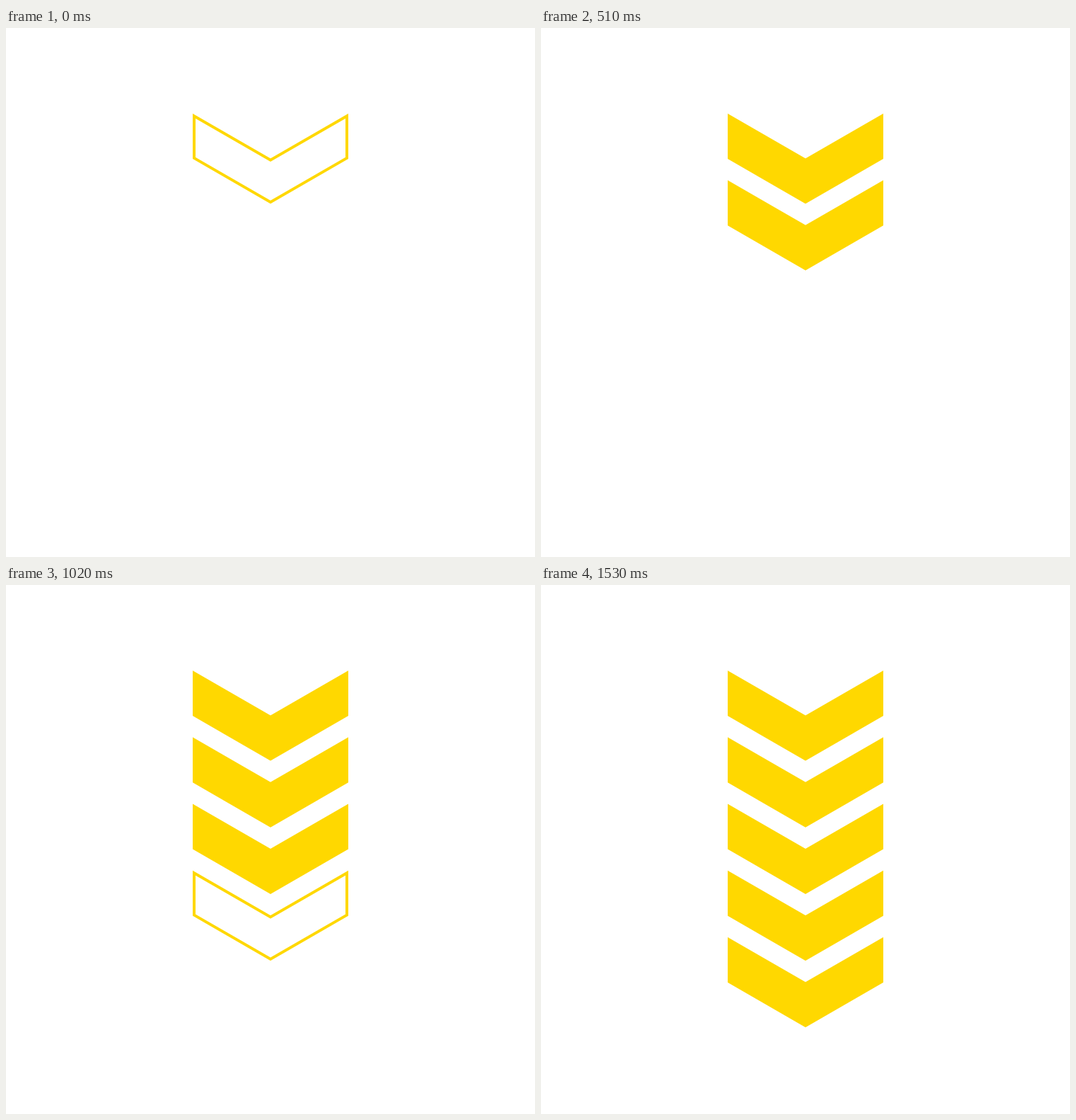
Recreate the animation shown at these times as an HTML page. Size 748 by 748 pixels, loop 1.73 s.

```html
<!DOCTYPE html>
<html lang="en">
<head>
<meta charset="utf-8">
<title>Chevrons</title>
<style>
  html, body { margin: 0; width: 100%; height: 100%; overflow: hidden; background: #fff; }
  svg { display: block; width: 100%; height: 100%; }
</style>
</head>
<body>
<svg viewBox="0 0 748 748">
  <defs>
    <path id="chevron" d="M266 124.5 L374 186.8 L482 124.5 V183.9 L374 246.2 L266 183.9 Z"/>
  </defs>
  <g id="stack" stroke="#ffd800" stroke-width="4"></g>
</svg>
<script>
  const COUNT = 5, PITCH = 94.25, STEP = 170, LOOP = 1730;
  const stack = document.getElementById('stack');

  const chevrons = Array.from({ length: COUNT }, (_, i) => {
    const use = document.createElementNS('http://www.w3.org/2000/svg', 'use');
    use.setAttribute('href', '#chevron');
    use.setAttribute('y', i * PITCH);
    return stack.appendChild(use);
  });

  // Each chevron appears as an outline, then fills one step later.
  function draw(time) {
    const step = Math.min(2 * COUNT - 1, Math.floor((time % LOOP) / STEP));
    chevrons.forEach((chevron, i) => {
      chevron.setAttribute('visibility', step >= 2 * i ? 'visible' : 'hidden');
      chevron.setAttribute('fill', step > 2 * i ? '#ffd800' : 'none');
    });
  }

  const start = performance.now();
  function tick() {
    draw(performance.now() - start);
    requestAnimationFrame(tick);
  }
  tick();
</script>
</body>
</html>
```
